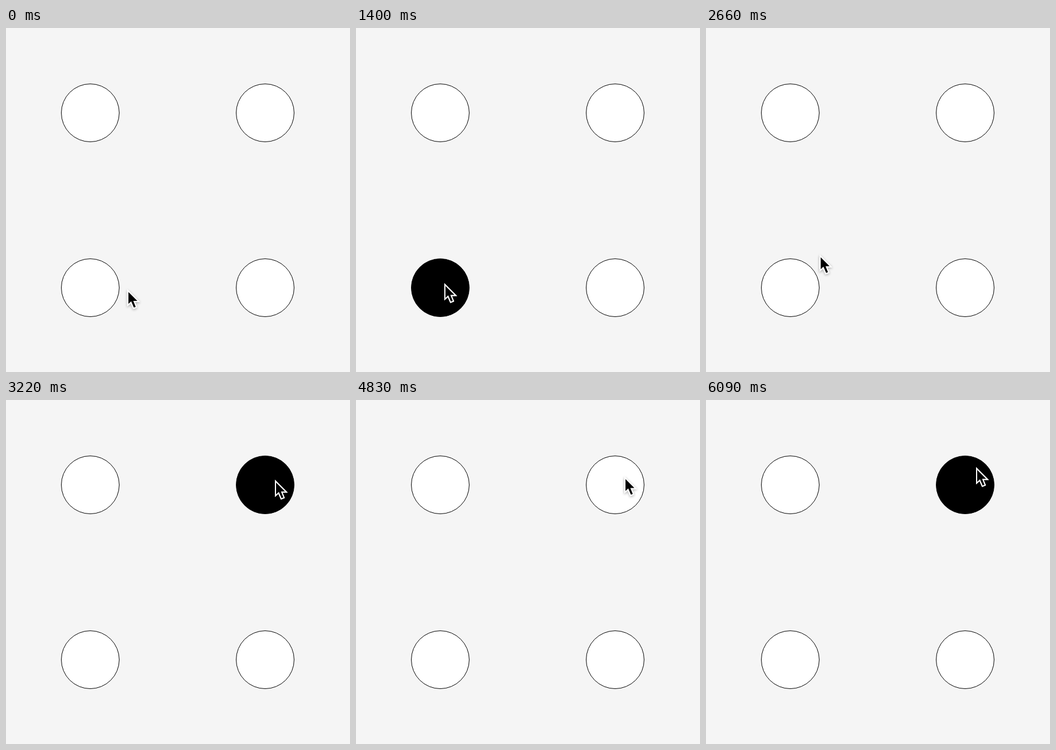
Animation, 600 px wide and 600 px high, one loop 6.16 s. Source, as an HTML page with a canvas:

```html
<!DOCTYPE html>
<html lang="en">
<head>
<meta charset="utf-8">
<title>Press and drag</title>
<style>
  html, body { margin: 0; width: 100%; height: 100%; overflow: hidden; background: #f5f5f5; }
  canvas { display: block; }
</style>
</head>
<body>
<canvas id="stage" width="600" height="600"></canvas>
<script>
const ctx = document.getElementById('stage').getContext('2d');
const LOOP = 6160, STEP = 70, FADE = 110, SAMPLES = 11;
const RADIUS = 50.5, SPACING = 305;

const home = { x: 211.5, y: 455.5 };
const moves = [
  { at: 0, time: 280, x: 154, y: 445 },
  { at: 1680, time: 350, x: 162, y: 430 },
  { at: 2030, time: 350, x: 198, y: 395 },
  { at: 2730, time: 490, x: 469, y: 139 },
  { at: 3360, time: 560, x: 356, y: 225.5 },
  { at: 4000, time: 480, x: 469, y: 136 },
  { at: 4690, time: 140, x: 468, y: 133 },
  { at: 5810, time: 280, x: 471, y: 117 }
];
const presses = [{ from: 400, to: 3950 }, { from: 4950, to: 5110 }, { from: 5620, to: LOOP }];

const arrow = new Path2D('M1 2.5V28L6.5 23L11 33.5L16 31.5L12 21.5H20Z');

const ease = u => u * u * (3 - 2 * u);

function pointerAt(t) {
  let { x, y } = home;
  for (const m of moves) {
    const k = ease(Math.min(1, Math.max(0, (t - m.at) / m.time)));
    x += (m.x - x) * k;
    y += (m.y - y) * k;
  }
  return { x, y };
}

// A circle is on while the pressed pointer is inside it.
function isOn(cx, cy, t) {
  if (!presses.some(p => t >= p.from && t < p.to)) return false;
  const p = pointerAt(t);
  return Math.hypot(p.x + 2 - cx, p.y + 4 - cy) < RADIUS;
}

// Averaging the recent past gives a linear fade.
function darkness(cx, cy, t) {
  let sum = 0;
  for (let i = 0; i < SAMPLES; i++) sum += isOn(cx, cy, t - i * FADE / SAMPLES);
  return sum / SAMPLES;
}

function drawCircle(cx, cy, t) {
  const c = Math.round(255 * (1 - darkness(cx, cy, t)));
  ctx.beginPath();
  ctx.arc(cx, cy, RADIUS, 0, Math.PI * 2);
  ctx.fillStyle = `rgb(${c},${c},${c})`;
  ctx.fill();
  ctx.strokeStyle = '#000';
  ctx.lineWidth = 1;
  ctx.stroke();
}

function drawPointer({ x, y }) {
  ctx.save();
  ctx.translate(x, y);
  ctx.strokeStyle = '#fff';
  ctx.fillStyle = '#000';
  ctx.lineWidth = 2;
  ctx.save();
  ctx.shadowColor = 'rgba(0,0,0,.4)';
  ctx.shadowBlur = 4;
  ctx.shadowOffsetY = 1.5;
  ctx.stroke(arrow);
  ctx.restore();
  ctx.fill(arrow);
  ctx.stroke(arrow);
  ctx.restore();
}

function draw(now) {
  const t = Math.floor((now % LOOP) / STEP) * STEP;
  ctx.fillStyle = '#f5f5f5';
  ctx.fillRect(0, 0, 600, 600);
  for (let row = 0; row < 2; row++) {
    for (let col = 0; col < 2; col++) drawCircle(147 + col * SPACING, 148 + row * SPACING, t);
  }
  drawPointer(pointerAt(t));
}

const begin = performance.now();
function tick() {
  draw(performance.now() - begin);
  requestAnimationFrame(tick);
}
tick();
</script>
</body>
</html>
```
